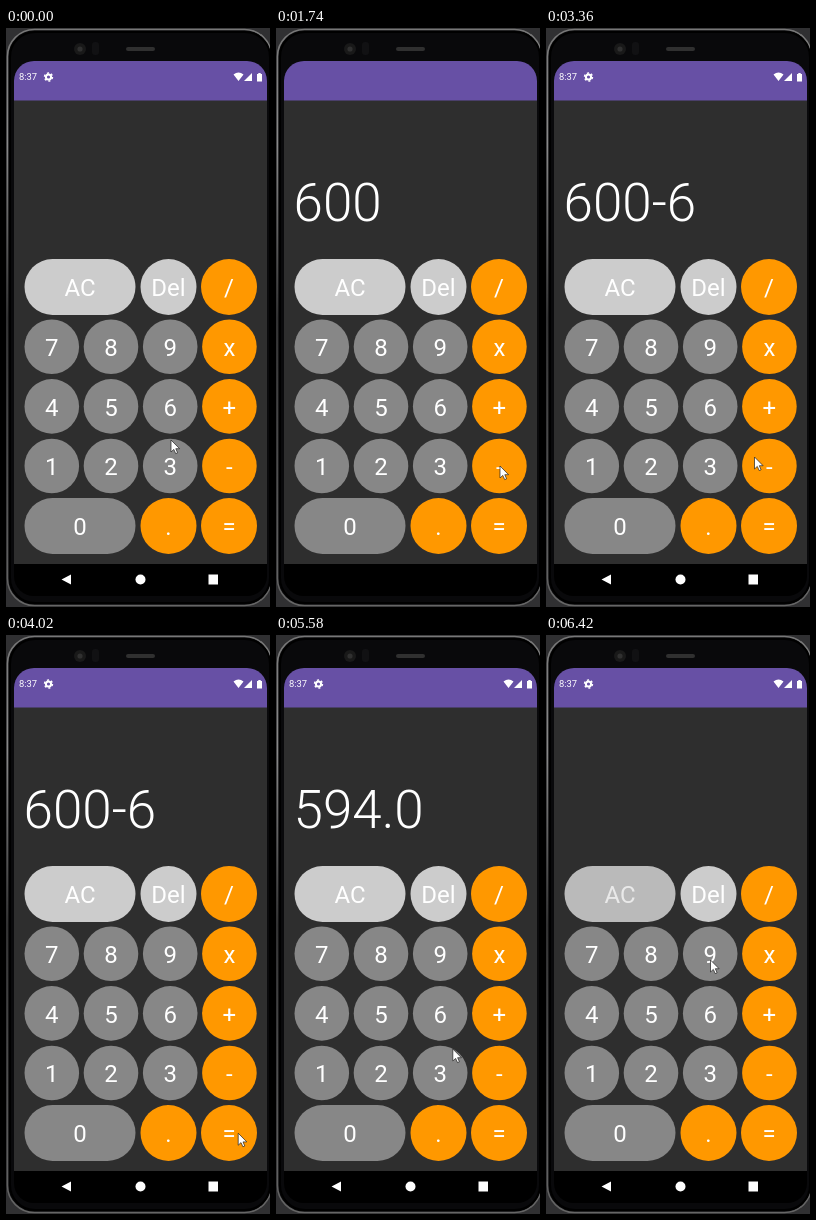
An HTML page for the animation above (6.44 s loop, 264x579 px).

```html
<!DOCTYPE html>
<html lang="en">
<head>
<meta charset="utf-8">
<title>Calculator</title>
<style>
  html, body { margin: 0; width: 100%; height: 100%; overflow: hidden; background: #303032; }
  svg { display: block; width: 264px; height: 579px; font-family: Roboto, Arial, sans-serif; }
  #keys text { font-size: 24px; fill: #fff; text-anchor: middle; }
</style>
</head>
<body>
<svg viewBox="0 0 264 579">
  <defs>
    <linearGradient id="rim" x2="0" y2="1">
      <stop offset="0" stop-color="#777"/>
      <stop offset=".2" stop-color="#888"/>
      <stop offset=".5" stop-color="#343434"/>
      <stop offset="1" stop-color="#666"/>
    </linearGradient>
    <clipPath id="glass"><rect x="8" y="33" width="253" height="535" rx="20"/></clipPath>
  </defs>

  <!-- phone body -->
  <rect x="1.5" y="1.5" width="264" height="576" rx="27" fill="#09090b" stroke="url(#rim)" stroke-width="1.6"/>
  <rect x="4" y="4" width="260" height="571" rx="25" fill="none" stroke="#000" stroke-width="2"/>
  <circle cx="74" cy="21" r="6" fill="#191919"/>
  <circle cx="74" cy="21" r="2.6" fill="#303030"/>
  <rect x="86" y="14" width="7" height="13" rx="3" fill="#111113"/>
  <rect x="120" y="19" width="29" height="4" rx="2" fill="#303030"/>

  <g clip-path="url(#glass)">
    <rect x="8" y="33" width="254" height="535"/>
    <g id="app">
      <rect x="8" y="72" width="254" height="464" fill="#2e2e2e"/>
      <rect x="8" y="33" width="254" height="39.5" fill="#6750a5"/>
      <text id="display" x="17.5" y="192.5" font-size="53" font-weight="300" fill="#fff"></text>
      <g id="keys"></g>
      <g id="system" fill="#fff">
        <text x="13" y="52.3" font-size="9.4">8:37</text>
        <g fill="none" stroke="#fff">
          <circle cx="42.5" cy="49" r="2.6" stroke-width="2"/>
          <circle cx="42.5" cy="49" r="4" stroke-width="1.4" stroke-dasharray="2.1 2.09"/>
        </g>
        <path d="M227.5 46.5Q232.5 42.5 237.5 46.5L232.5 53ZM238 53L246 45V53ZM251 46H252.3V45H254.7V46H256V53.5H251Z"/>
        <path d="M55.5 551.5L65 546.5V556.5ZM202.5 546.5H212V556.5H202.5Z"/>
        <circle cx="134.5" cy="551.5" r="5"/>
      </g>
    </g>
  </g>
  <path id="pointer" d="M0 0V12L2.8 9.4L4.7 13.6L6.6 12.8L4.8 8.7H8.6Z" fill="#fff" stroke="#222" stroke-width=".7"/>
</svg>
<script>
const LOOP = 6440;
const $ = id => document.getElementById(id);
const LIGHT = '#cccccc', GREY = '#878787', ORANGE = '#ff9800';

// label, x, y, width, height, colour
const keys = [
  ['AC', 18.5, 231, 111, 56, LIGHT], ['Del', 134.5, 231, 56, 56, LIGHT], ['/', 195, 231, 56, 56, ORANGE],
  ['0', 18.5, 470, 111, 56, GREY], ['.', 134.5, 470, 56, 56, ORANGE], ['=', 195, 470, 56, 56, ORANGE]
];
['789x', '456+', '123-'].forEach((row, r) => [...row].forEach((label, c) =>
  keys.push([label, 18.5 + c * 59.2, 291.5 + r * 59.6, 54.6, 54.6, c < 3 ? GREY : ORANGE])));

const shades = {};
function add(tag, attrs) {
  const el = document.createElementNS('http://www.w3.org/2000/svg', tag);
  for (const name in attrs) el.setAttribute(name, attrs[name]);
  return $('keys').appendChild(el);
}
for (const [label, x, y, width, height, fill] of keys) {
  const box = { x, y, width, height, rx: height / 2 };
  add('rect', { ...box, fill });
  add('text', { x: x + width / 2, y: y + height / 2 + 9.3 }).textContent = label;
  shades[label] = add('rect', { ...box, fill: '#000', opacity: 0 });
}

// time, pointer tip x, y
const path = [
  [0, 165, 412], [230, 165, 383], [460, 165, 383], [680, 146, 408], [900, 81, 489],
  [1260, 80, 489], [1680, 224, 438], [2060, 224, 438], [2520, 164, 380], [2900, 164, 380],
  [3360, 208.5, 429], [3760, 232, 498], [4660, 233, 499], [5340, 233, 499],
  [5920, 83, 272], [6160, 83, 272], [6420, 164.5, 325], [LOOP, 165, 328]
];
const readout = [[0, ''], [320, '6'], [860, '60'], [1020, '600'], [1840, '600-'], [2760, '600-6'], [4200, '594.0'], [6080, '']];
// key, press time, release time
const presses = [['6', 270, 340], ['-', 1780, 1850], ['6', 2700, 2780], ['=', 4140, 4220], ['AC', 6060, 6400]];

const within = (t, a, b) => t >= a && t < b;
const clamp = v => Math.max(0, Math.min(1, v));

function pointerAt(t) {
  const i = path.findIndex(p => p[0] > t);
  const [t0, x0, y0] = path[i - 1], [t1, x1, y1] = path[i];
  const k = (t - t0) / (t1 - t0), e = k * k * (3 - 2 * k);
  return [x0 + (x1 - x0) * e, y0 + (y1 - y0) * e];
}

function draw(t) {
  const blank = within(t, 960, 1480) || within(t, 6060, 6320);
  $('app').style.display = blank ? 'none' : '';
  $('system').style.display = within(t, 960, 1800) ? 'none' : '';
  $('display').textContent = readout.filter(r => r[0] <= t).pop()[1];
  for (const label in shades) {
    const dim = presses.filter(p => p[0] === label)
      .map(([, down, up]) => 0.1 * Math.min(clamp((t - down) / 60), clamp((up + 160 - t) / 160)));
    shades[label].setAttribute('opacity', Math.max(0, ...dim));
  }
  $('pointer').setAttribute('transform', `translate(${pointerAt(t)})`);
}

const start = performance.now();
function tick() {
  draw((performance.now() - start) % LOOP);
  requestAnimationFrame(tick);
}
tick();
</script>
</body>
</html>
```
